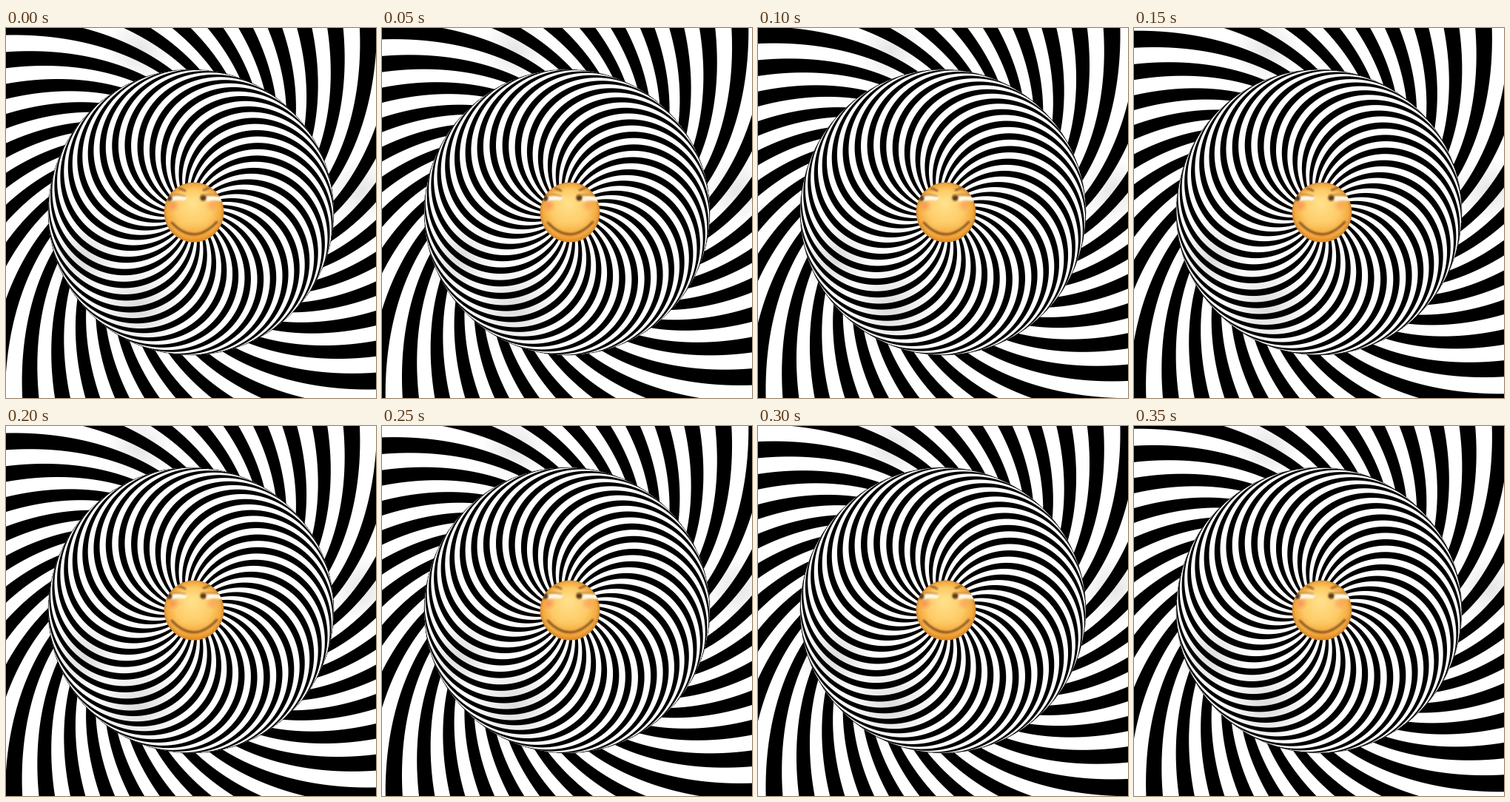
Animation, 500 px wide and 500 px high, one loop 400 ms. Source, as an HTML page with a canvas:

```html
<!DOCTYPE html>
<html lang="en">
<head>
<meta charset="utf-8">
<title>Spiral sphere</title>
<style>
  html, body { margin: 0; width: 100%; height: 100%; overflow: hidden; background: #fff; }
  canvas { display: block; width: 100vw; height: 100vh; }
</style>
</head>
<body>
<canvas id="stage" width="500" height="500"></canvas>
<script>
const start = performance.now();
const SIZE = 500, CX = 250, CY = 249, RADIUS = 193;
const ARMS = 33, LOOP = 400, STEPS = 8;
const TURN = 2 * Math.PI;
const ctx = document.getElementById('stage').getContext('2d');

// Per pixel: stripe phase (in periods), its change per pixel, and direction of travel.
const phase = new Float32Array(SIZE * SIZE);
const slope = new Float32Array(SIZE * SIZE);
const travel = new Int8Array(SIZE * SIZE);

for (let y = 0, i = 0; y < SIZE; y++) {
  for (let x = 0; x < SIZE; x++, i++) {
    const dx = x + 0.5 - CX, dy = y + 0.5 - CY;
    const r = Math.hypot(dx, dy), angle = Math.atan2(dy, dx);
    const density = ARMS / (TURN * r);
    if (r < RADIUS) {
      // Arms on a sphere seen from above, twisting clockwise with latitude.
      const tilt = Math.asin(r / RADIUS);
      const twist = 1.08 * tilt + 0.03 * tilt ** 3;
      const twistRate = 1.08 + 0.09 * tilt ** 2;
      phase[i] = ARMS * (angle - twist) / TURN - 0.76;
      slope[i] = density * Math.hypot(1, twistRate * Math.tan(tilt));
      travel[i] = 1;
    } else {
      // 45 degree logarithmic spirals, turning anticlockwise.
      phase[i] = ARMS * (angle + Math.log(r)) / TURN - 0.47;
      slope[i] = density * Math.SQRT2;
      travel[i] = -1;
    }
  }
}

function drawStripes(progress) {
  const image = ctx.createImageData(SIZE, SIZE);
  const pixels = new Uint32Array(image.data.buffer);
  for (let i = 0; i < pixels.length; i++) {
    const u = phase[i] - travel[i] * progress;
    const distance = Math.abs(u - Math.round(u));
    const light = Math.min(1, Math.max(0, (distance - 0.25) / slope[i] + 0.5));
    pixels[i] = 0xff000000 | Math.round(255 * light) * 0x010101;
  }
  ctx.putImageData(image, 0, 0);
}

function glow(x, y, r, rgb, alpha) {
  const g = ctx.createRadialGradient(x, y, 0, x, y, r);
  g.addColorStop(0, `rgba(${rgb},${alpha})`);
  g.addColorStop(1, `rgba(${rgb},0)`);
  ctx.fillStyle = g;
  ctx.fillRect(x - r, y - r, 2 * r, 2 * r);
}

function ellipse(x, y, rx, ry, color) {
  ctx.fillStyle = color;
  ctx.beginPath();
  ctx.ellipse(x, y, rx, ry, 0, 0, TURN);
  ctx.fill();
}

function curve(x1, y1, cx, cy, x2, y2, width, color) {
  ctx.strokeStyle = color;
  ctx.lineWidth = width;
  ctx.lineCap = 'round';
  ctx.beginPath();
  ctx.moveTo(x1, y1);
  ctx.quadraticCurveTo(cx, cy, x2, y2);
  ctx.stroke();
}

function drawShading() {
  glow(105, 312, 50, '0,0,0', 0.14);
  glow(180, 378, 60, '0,0,0', 0.14);
  glow(180, 30, 45, '0,0,0', 0.1);
  glow(480, 220, 45, '0,0,0', 0.1);
  ctx.strokeStyle = 'rgba(0,0,0,0.5)';
  ctx.lineWidth = 1;
  ctx.beginPath();
  ctx.arc(CX, CY, RADIUS, 0, TURN);
  ctx.stroke();
}

function drawFace() {
  const skin = ctx.createRadialGradient(252, 236, 4, 254, 249, 41);
  skin.addColorStop(0, '#ffdf88');
  skin.addColorStop(0.55, '#fdcb67');
  skin.addColorStop(0.88, '#f3a940');
  skin.addColorStop(1, '#c97f2c');
  ctx.save();
  ctx.beginPath();
  ctx.arc(254, 249, 40.5, 0, TURN);
  ctx.clip();
  ctx.fillStyle = skin;
  ctx.fillRect(213, 208, 82, 82);
  glow(254, 288, 28, '240,140,20', 0.4);
  glow(226, 240, 9, '245,110,80', 0.5);
  glow(278, 240, 9, '245,110,80', 0.35);
  ctx.filter = 'blur(0.8px)';
  curve(223, 231, 232, 229, 241, 230, 6, '#fff8ea');
  curve(272, 231, 281, 229, 291, 231, 6, '#fff8ea');
  ellipse(221, 230, 3.5, 4, '#5a3a1c');
  ellipse(266.5, 229.5, 4, 4, '#5a3a1c');
  curve(222, 226, 232, 224, 242, 227, 1.5, '#b98542');
  curve(264, 226, 278, 224, 291, 227, 1.5, '#b98542');
  curve(234, 217, 238, 217, 242, 220, 2.5, '#8a5a25');
  curve(267, 219, 271, 218, 276, 215, 2.5, '#8a5a25');
  curve(224, 263, 254, 295, 285, 262, 3, '#8a5520');
  ctx.restore();
}

let shown = -1;
function render(now) {
  const elapsed = Math.max(0, now - start) % LOOP;
  const step = Math.floor(elapsed / LOOP * STEPS);
  if (step !== shown) {
    shown = step;
    drawStripes(step / STEPS);
    drawShading();
    drawFace();
  }
  requestAnimationFrame(render);
}
render(start);
</script>
</body>
</html>
```
